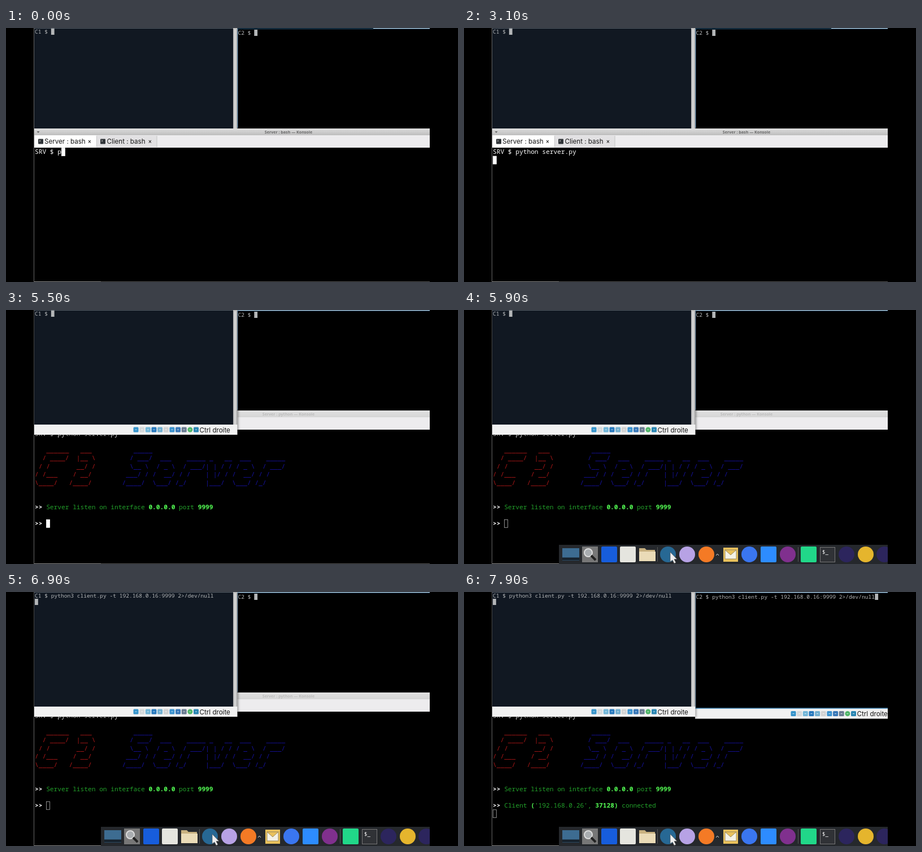
Write an HTML page that moves like this. It is 800x450 px and loops after 8 s.

```html
<!DOCTYPE html>
<html lang="en">
<head>
<meta charset="utf-8">
<title>Terminal session</title>
<style>
html, body { margin: 0; width: 100%; height: 100%; overflow: hidden; background: #000; }
svg { display: block; width: 800px; height: 450px; }
text { white-space: pre; }
.srv text { font: 11.2px "Noto Sans Mono", monospace; fill: #fff; }
.srv .red { fill: #b21818; }
.srv .blue { fill: #1612a4; }
.srv .green { fill: #22a02a; }
.srv .hi { fill: #54ff54; }
.srv .hi, .srv .bold { font-weight: 700; }
.vm { font: 9.6px "Noto Sans Mono", monospace; fill: #b4b6b8; }
.ui { font: 11.6px Inter, sans-serif; fill: #161616; }
.x { font: bold 8px "DejaVu Sans", sans-serif; fill: #222; }
#title { font: bold 7.1px "Noto Sans", sans-serif; text-anchor: middle; }
</style>
</head>
<body>
<svg viewBox="0 0 800 450">
  <defs>
    <linearGradient id="bar" x2="0" y2="1">
      <stop stop-color="#dedede"/><stop offset="1" stop-color="#bdbdbd"/>
    </linearGradient>
    <clipPath id="screen"><rect x="49" width="701" height="450"/></clipPath>
    <filter id="shadow" x="-5%" y="-5%" width="110%" height="115%" color-interpolation-filters="sRGB">
      <feDropShadow dx="0" dy="1" stdDeviation="2.5" flood-opacity=".7"/>
    </filter>
    <g id="tabIcon">
      <rect width="9" height="9" rx="1" fill="#303438"/>
      <path d="M2 2l2 1.5L2 5" fill="none" stroke="#ddd" stroke-width=".8"/>
    </g>
    <g id="status"></g>
  </defs>
  <rect width="800" height="450"/>
  <g clip-path="url(#screen)">
    <path d="M49.5 0V450" stroke="#666"/>
    <path d="M50 449.5H750" stroke="#555"/>
    <path d="M50 449.5H168" stroke="#909090"/>

    <g class="srv">
      <text x="51" y="223" id="command"></text>
      <g id="banner"></g>
      <text x="51" y="353" id="listen"><tspan class="bold">&gt;&gt;</tspan><tspan class="green"> Server listen on interface </tspan><tspan class="hi">0.0.0.0</tspan><tspan class="green"> port </tspan><tspan class="hi">9999</tspan></text>
      <text x="51" y="382" id="prompt" class="bold">&gt;&gt;</text>
      <text x="71.2" y="382" id="client"><tspan class="green">Client </tspan><tspan class="hi">(</tspan><tspan class="green">'192.168.0.26', </tspan><tspan class="hi">37128)</tspan><tspan class="green"> connected</tspan></text>
      <rect id="cursor" width="6" height="14"/>
    </g>

    <rect x="50" y="178" width="700" height="12" fill="url(#bar)"/>
    <rect x="50" y="190" width="700" height="22" fill="#edecee"/>
    <path d="M54.5 183h5l-2.5 3z" fill="#666"/>
    <g id="tabs">
      <rect id="tab" x="51" y="190" height="22" fill="#fff"/>
      <use href="#tabIcon" x="57" y="196.5"/>
      <text class="ui" x="68" y="205" id="tabName"></text>
      <text class="x" id="close" y="204">×</text>
      <g id="tab2">
        <rect x="160" y="191" width="107" height="20" fill="#e2e1e3"/>
        <path d="M160.5 191V211M267 191V211" stroke="#c4c4c4"/>
        <use href="#tabIcon" x="167" y="196.5"/>
        <text class="ui" x="178.5" y="205">Client : bash</text>
        <text class="x" x="251.5" y="204">×</text>
      </g>
    </g>
    <rect id="fade" x="50" y="178" width="700" height="12" fill="#e4e4e4" opacity=".65"/>
    <text id="title" x="500" y="187"></text>

    <g id="c2">
      <rect class="frame" x="409" width="341"/>
      <rect class="slot" x="409" y="1" width="1.5" fill="#386d98"/>
      <path d="M409 1.5H750" stroke="#285c82"/>
      <path id="topEdge" stroke="#c7d0d5"/>
      <text class="vm" x="410.5" y="12"></text>
      <rect class="caret" width="5.8" height="11" fill="#b4b6b8"/>
      <g class="foot">
        <rect x="409" y="206" width="341" height="18.5" fill="#f1f1f1"/>
        <use href="#status" x="403" y="206.5"/>
        <path d="M409 206H750" stroke="#4386b5" stroke-width="1.5"/>
      </g>
    </g>
    <g id="c1">
      <rect class="frame" x="50" width="359.5" fill="#b9b9b9"/>
      <rect class="body" x="50" y="1" width="352" fill="#111822"/>
      <path d="M50 .5H402" stroke="#555d66"/>
      <rect class="slot" x="404" y="2" width="3" fill="#d5d5d5"/>
      <text class="vm" x="51" y="10"></text>
      <rect class="caret" width="5.8" height="11" fill="#b4b6b8"/>
      <g class="foot">
        <rect x="50" y="203" width="359.5" height="18" fill="#f1f1f1"/>
        <use href="#status" x="50" y="203"/>
      </g>
    </g>

    <g id="dock">
      <rect x="168" y="416" width="582" height="34" fill="#25282c"/>
      <g id="icons"></g>
      <path d="M342.5 420V446M591.5 420V446" stroke="#555"/>
      <path d="M446 435l2.5-3 2.5 3" fill="none" stroke="#ddd"/>
      <rect x="174" y="422" width="30" height="22" fill="#3d6c91"/>
      <path d="M174 441H204" stroke="#17222c" stroke-width="5"/>
      <rect x="209" y="419" width="28" height="28" fill="#777"/>
      <circle cx="220" cy="430" r="7" fill="#a9adb0" stroke="#ddd" stroke-width="2"/>
      <path d="M225 435l8 8" stroke="#222" stroke-width="4"/>
      <path d="M310 422h10l3 3h15v20h-28z" fill="#c8b180"/>
      <path d="M310 428h29v17h-29z" fill="#eadbb7"/>
      <rect x="459" y="421" width="26" height="25" fill="#e9c15c"/>
      <path d="M462 425h20v16h-20zl10 9 10-9" fill="#f5f2e7" stroke="#9b8a61"/>
      <rect x="630.5" y="420.5" width="26" height="26" fill="#303236" stroke="#777"/>
      <text x="634" y="432" font-family="Noto Sans Mono, monospace" font-size="9" fill="#fff">$_</text>
      <path d="M365 429v17l4-3 3 6 3-1.5-3-6h5z" fill="#eee" stroke="#555" stroke-width=".7"/>
    </g>
  </g>
</svg>
<script>
const LOOP = 8000, CELL = 6.72, ROW = 14.43, VM_CELL = 5.76;
const $ = s => document.querySelector(s);
const set = (el, attrs) => { for (const k in attrs) el.setAttribute(k, attrs[k]); };
const show = (el, on) => { el.style.visibility = on ? "visible" : "hidden"; };
// Latest value whose start time has passed
const at = (t, steps) => steps.filter(s => s[0] <= t).pop()[1];

const art = {
  red: [0, String.raw`   ______   ___
  / ____/  |__ \
 / /       __/ /
/ /___    / __/
\____/   /____/`],
  blue: [23, String.raw`   _____
  / ___/  ___    _____ _   __  ___    _____
  \__ \  / _ \  / ___/| | / / / _ \  / ___/
 ___/ / /  __/ / /    | |/ / /  __/ / /
/____/  \___/ /_/     |___/  \___/ /_/`]
};
for (const [color, [col, rows]] of Object.entries(art))
  rows.split("\n").forEach((row, i) => {
    const text = document.createElementNS("http://www.w3.org/2000/svg", "text");
    set(text, { class: color, x: 51 + col * CELL, y: 223 + (i + 2) * ROW });
    text.textContent = row;
    $("#banner").append(text);
  });

const lights = ["#3694cb", "#d5d9db", "#72b6d8", "#2879bd", "#72afd0", "#d2d2d2",
  "#3b92ce", "#3978b8", "#697b91", "#4fb568", "#2a86b3"];
$("#status").innerHTML =
  lights.map((c, i) => `<rect x="${175.5 + i * 10.65}" y="4.5" width="9" height="9" rx="${i == 9 ? 4.5 : 1.5}" fill="${c}"/>
    <path d="M${178.5 + i * 10.65} 9h3" stroke="#fff" opacity=".7"/>`).join("") +
  '<text class="ui" x="292.5" y="13.5">Ctrl droite</text>';

// Plain application marks: centre, colour, round or square
$("#icons").innerHTML = [
  [257, "#175ddc"], [290, "#e5e5df"], [361, "#276894", 1], [395, "#b7a2e5", 1],
  [429, "#f47a25", 1], [505, "#3a76f0", 1], [539, "#2d8cff"], [573, "#80308e", 1],
  [610, "#21d789"], [677, "#2c255d", 1], [711, "#e5b52d", 1], [744, "#2c255d", 1]
].map(([x, c, round]) =>
  `<rect x="${x - 14}" y="419" width="28" height="28" rx="${round ? 14 : 2}" fill="${c}"/>`).join("");

const typing = [[0, "p"], [700, "py"], [800, "pyt"], [1000, "pyth"], [1100, "pytho"],
  [1300, "python"], [1400, "python "], [1500, "python s"], [1700, "python server.py "]];
const clientCommand = "python3 client.py -t 192.168.0.16:9999 2>/dev/null";

function drawVm(id, x, top, bottom, raised, line, entered) {
  const part = c => $(`#${id} .${c}`);
  const end = raised ? bottom : 178;
  set(part("frame"), { height: end });
  set(part("slot"), { height: end - 2 });
  part("vm").textContent = line;
  set(part("caret"), {
    x: x + (entered ? 0 : line.length * VM_CELL),
    y: top + (entered ? 11 : 0)
  });
  show(part("foot"), raised);
}

function draw(t) {
  const command = "SRV $ " + at(t, typing);
  const printed = t >= 3300, running = t >= 3500, prompt = t >= 4600;
  const raised = t >= 5500, blurred = t >= 5700, connected = t >= 7200;

  $("#command").textContent = command;
  show($("#banner"), printed);
  show($("#listen"), printed);
  show($("#prompt"), prompt);
  show($("#client"), connected);
  const [col, row] = at(t, [[0, [command.length, 0]], [2800, [0, 1]], [3300, [0, 10]],
    [4600, [3, 11]], [7200, [0, 12]]]);
  set($("#cursor"), {
    x: 51 + col * CELL + .3, y: 212.6 + row * ROW,
    fill: blurred ? "none" : "#fff", stroke: blurred ? "#b0b0b0" : "#fff", "stroke-width": .8
  });

  const name = running ? "python" : "bash", shift = running ? 12 : 0;
  $("#title").textContent = `Server : ${name} — Konsole`;
  $("#title").style.fill = raised ? "#bcbcbc" : "#686868";
  $("#tabName").textContent = "Server : " + name;
  set($("#tab"), { width: 109 + shift });
  set($("#close"), { x: 144.4 + shift });
  set($("#tab2"), { transform: `translate(${shift})` });
  show($("#fade"), raised);

  drawVm("c1", 51, 1, 203, raised,
    "C1 $ " + (t >= 6100 ? clientCommand + " " : ""), t >= 6900);
  set($("#c1 .body"), { height: raised ? 202 : 177 });
  set($("#c1"), { filter: raised ? "url(#shadow)" : "none" });
  drawVm("c2", 410.5, 3, 206, t >= 7600,
    "C2 $ " + (t >= 7800 ? clientCommand : ""), false);
  set($("#topEdge"), { d: `M${raised ? 409 : 650} .5H750` });

  show($("#dock"), blurred);
  const slide = Math.min(1, Math.max(0, (t - 5700) / 200));
  set($("#dock"), { transform: `translate(0 ${34 * (1 - slide) ** 2})` });
}

function tick() {
  draw(performance.now() % LOOP);
  requestAnimationFrame(tick);
}
tick();
</script>
</body>
</html>
```
